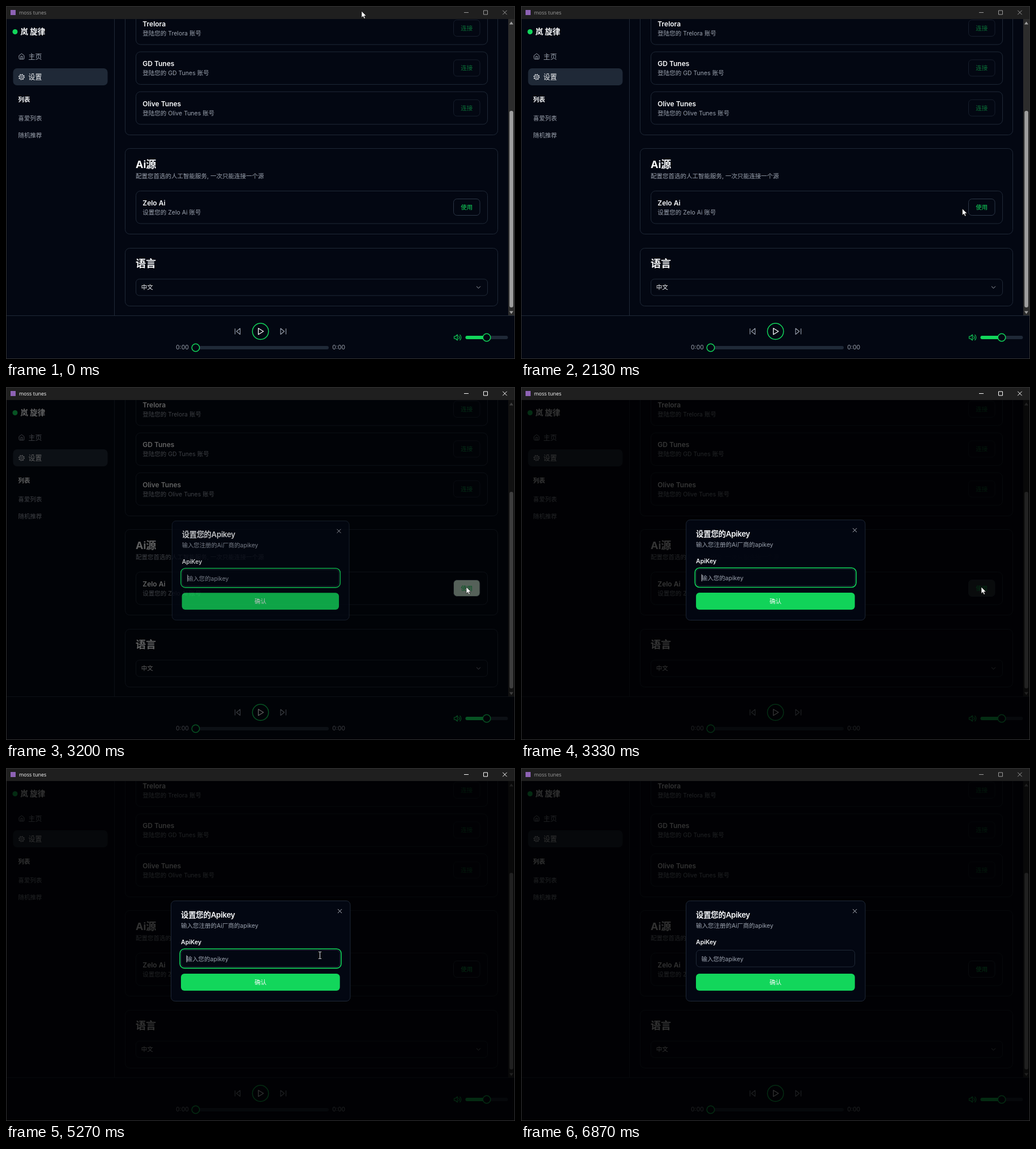
An HTML page that plays this animation: 899x623 px, repeating every 7.34 s.

```html
<!DOCTYPE html>
<html lang="zh-CN">
<head>
<meta charset="utf-8">
<title>Player settings</title>
<style>
  html, body { margin: 0; width: 100%; height: 100%; overflow: hidden; background: #030712; }
  svg { display: block; }
  text { font: 400 10.5px Inter, "Noto Sans CJK SC", "Noto Sans CJK", sans-serif; fill: #9ca3af; white-space: pre; }
  .brand { font-size: 13.5px; font-weight: 700; fill: #f9fafb; }
  .nav { font-size: 12px; }
  .name { font-size: 12px; font-weight: 600; fill: #f9fafb; }
  .head { font-size: 18px; font-weight: 700; fill: #f9fafb; }
  .strong { font-weight: 600; fill: #f9fafb; }
  .mid { font-weight: 500; fill: #f9fafb; }
  .act { font-weight: 500; fill: #12d65b; text-anchor: middle; }
  .box { fill: none; stroke: #1f2937; }
  .icon { fill: none; stroke: #9ca3af; stroke-linecap: round; stroke-linejoin: round; }
  .green { stroke: #12d65b; }
  .knob { fill: #030712; stroke: #12d65b; stroke-width: 1.5; }
  .caption { font: 400 9px "Open Sans", sans-serif; fill: inherit; }
</style>
</head>
<body>
<svg width="899" height="623" viewBox="0 0 899 623">
  <rect width="899" height="623" fill="#030712"/>

  <!-- sidebar -->
  <circle cx="16" cy="45.5" r="4.5" fill="#12d65b"/>
  <text class="brand" x="25.5" y="50.3">岚 旋律</text>
  <g class="icon" transform="translate(21.7 83) scale(.49)" stroke-width="2">
    <path d="M3 9l9-7 9 7v11a2 2 0 0 1-2 2H5a2 2 0 0 1-2-2zM9 22V12h6v10"/>
  </g>
  <text class="nav" x="39.5" y="93.7">主页</text>
  <rect x="12.5" y="110" width="167" height="30" rx="7" fill="#1f2937"/>
  <g fill="none" stroke="#e5e7eb" transform="translate(27.5 125.3)">
    <circle r="3.9"/>
    <circle r="4.8" stroke-width="1.3" stroke-dasharray="1.7 2.07"/>
    <circle r="1.6" stroke-width=".9"/>
  </g>
  <text class="nav" x="39.5" y="129.9" style="fill:#f9fafb">设置</text>
  <text class="strong" x="21.5" y="169.2">列表</text>
  <text x="21.5" y="202.2">喜爱列表</text>
  <text x="21.5" y="232.2">随机推荐</text>
  <path class="box" d="M191.5 23V546"/>

  <!-- settings cards -->
  <path class="box" d="M210.5 23V219.5a8 8 0 0 0 8 8H860.5a8 8 0 0 0 8-8V23"/>
  <g id="services"></g>
  <rect class="box" x="210.5" y="251.5" width="658" height="151" rx="8"/>
  <text class="head" x="229" y="285.6">Ai源</text>
  <text x="229" y="304.2">配置您首选的人工智能服务, 一次只能连接一个源</text>
  <g transform="translate(0 326)">
    <rect class="box" x="229.5" y=".5" width="621" height="57.5" rx="8"/>
    <text class="name" x="241.3" y="26">Zelo Ai</text>
    <text x="241.3" y="41.8">设置您的 Zelo Ai 账号</text>
    <rect id="use" x="790.5" y="14.5" width="46.5" height="29" rx="6" fill="#dcfce7" fill-opacity="0" stroke="#2b3646"/>
    <text class="act" x="813.7" y="33">使用</text>
  </g>
  <rect class="box" x="210.5" y="427.5" width="658" height="102" rx="8"/>
  <text class="head" x="229" y="461">语言</text>
  <rect class="box" x="229.5" y="482" width="621" height="29" rx="6"/>
  <text class="mid" x="238.8" y="500.4">中文</text>
  <path class="icon" d="M831.3 495l3.2 3.2 3.2-3.2"/>

  <!-- scrollbar -->
  <rect x="887" y="23" width="11" height="523" fill="#2c2c2c"/>
  <rect x="889.3" y="185" width="6.6" height="347" rx="3.3" fill="#9f9f9f"/>
  <path d="M889 32.5h7l-3.5-5zM889 538.5h7l-3.5 5z" fill="#9f9f9f"/>

  <!-- player -->
  <path class="box" d="M1 546.5H898"/>
  <g class="icon" stroke-width="1.1">
    <path d="M404.5 569.5v9.5M413.5 569v10.5l-6.5-5.25z"/>
    <path d="M494.5 569.5v9.5M485 569v10.5l6.5-5.25z"/>
    <path d="M445.7 568.8v11l9-5.5z" stroke="#f9fafb" stroke-width="1.3"/>
  </g>
  <circle class="icon green" cx="449.5" cy="574.3" r="14.2" stroke-width="1.5"/>
  <text x="300" y="606.3">0:00</text>
  <text x="576.3" y="606.3">0:00</text>
  <rect x="329" y="600" width="241" height="6" rx="3" fill="#1f2937"/>
  <circle class="knob" cx="335" cy="603" r="6.8"/>
  <path class="icon green" stroke-width="1.1" d="M791.5 583v4h2.4l3.4 3v-10l-3.4 3zM799.7 582.6a3.4 3.4 0 0 1 0 4.8M801.8 580.4a6.5 6.5 0 0 1 0 9.2"/>
  <rect x="811.5" y="582" width="75" height="6" rx="3" fill="#1f2937"/>
  <rect x="811.5" y="582" width="37" height="6" rx="3" fill="#12d65b"/>
  <circle class="knob" cx="849" cy="585" r="6.8"/>

  <!-- dialog -->
  <rect id="shade" y="23" width="899" height="600" opacity="0"/>
  <g id="dialog" opacity="0">
    <rect x="291.5" y="234.5" width="316.5" height="177" rx="7" fill="#030712" stroke="#1f2937"/>
    <text class="brand" x="309" y="263.6" style="font-weight:600;letter-spacing:-.34px">设置您的Apikey</text>
    <text x="309" y="282.2">输入您注册的Ai厂商的apikey</text>
    <path class="icon" style="stroke:#b9bec8" d="M586.4 249.4l6.4 6.4m0-6.4l-6.4 6.4"/>
    <text class="strong" x="309" y="311">ApiKey</text>
    <rect class="box" x="309.5" y="321.5" width="280" height="29.5" rx="6"/>
    <rect id="ring" class="icon green" x="307.2" y="319.2" width="284.8" height="34.2" rx="8" stroke-width="1.6"/>
    <text x="318.6" y="341">输入您的apikey</text>
    <path id="caret" d="M319.2 330.5v12.5" stroke="#e5e7eb" stroke-width=".9"/>
    <rect x="309" y="363" width="280.7" height="30" rx="6" fill="#12d65b"/>
    <text class="mid" x="449.4" y="382.2" text-anchor="middle">确认</text>
  </g>

  <!-- title bar -->
  <rect width="899" height="23" fill="#1f1f1f"/>
  <rect x="8" y="7" width="9" height="9" fill="#8d62b4"/>
  <g id="bar" fill="#9c9c9c" stroke="#9c9c9c">
    <text class="caption" x="23" y="15" stroke="none">moss tunes</text>
    <path fill="none" d="M809 11.5h8M843.5 8h7v7h-7zM877.3 7.8l7.4 7.4m0-7.4l-7.4 7.4"/>
  </g>
  <rect x=".5" y=".5" width="898" height="622" fill="none" stroke="#333"/>

  <!-- pointers -->
  <path id="arrow" d="M0 0V11.6L2.7 9.1 4.6 13.3 6.5 12.5 4.7 8.4H8.3Z" fill="#fff" stroke="#000" stroke-width=".6"/>
  <path id="beam" d="M-2.5-6h2L0-5.5.5-6h2M0-5.5V5.5M-2.5 6h2L0 5.5.5 6h2" fill="none" stroke="#e8e8e8"/>
</svg>

<script>
const LOOP = 7340, STEP = 1000 / 15;
const el = id => document.getElementById(id);
const clamp = v => Math.min(1, Math.max(0, v));
const set = (id, name, value) => el(id).setAttribute(name, value);
const show = (id, on) => set(id, 'visibility', on ? 'visible' : 'hidden');

el('services').innerHTML = ['Trelora', 'GD Tunes', 'Olive Tunes'].map((name, i) => `
  <g transform="translate(0 ${10 + i * 70.4})">
    <rect class="box" x="229.5" y=".5" width="621" height="57.5" rx="8"/>
    <text class="name" x="241.3" y="26">${name}</text>
    <text x="241.3" y="41.8">登陆您的 ${name} 账号</text>
    <g opacity=".5">
      <rect x="790.5" y="14.5" width="46.5" height="29" rx="6" fill="none" stroke="#2b3646"/>
      <text class="act" x="813.7" y="33">连接</text>
    </g>
  </g>`).join('');

const linear = s => s;
const smooth = s => s * s * (3 - 2 * s);
const out = s => 1 - (1 - s) ** 2;

// pointer stops: tick, x, y, easing towards the stop
const stops = [
  [1, 628, 9, linear], [9, 397, 325, smooth], [15, 397, 325, linear],
  [26, 777.5, 358, smooth], [31, 777.5, 358, linear], [38, 813, 353, smooth],
  [54, 813, 353, linear], [59, 632, 347, linear], [66, 560, 333, out],
  [72, 554.5, 330.5, out], [86, 554.5, 330.5, linear], [89, 163, 606, linear]
];

function pointer(tick) {
  const i = stops.findIndex(s => s[0] >= tick);
  if (i < 0) return null;
  const b = stops[i], a = stops[i - 1] || b;
  const s = a === b ? 1 : b[3]((tick - a[0]) / (b[0] - a[0]));
  return [a[1] + (b[1] - a[1]) * s, a[2] + (b[2] - a[2]) * s];
}

function draw(t) {
  const tick = Math.floor((t + 4) / STEP);

  const p = pointer(tick);
  const typing = p && tick > 50 && p[0] < 590 && p[1] > 321 && p[1] < 351;
  show('arrow', p && !typing);
  show('beam', typing);
  if (p) set(typing ? 'beam' : 'arrow', 'transform', `translate(${p[0]} ${p[1]})`);

  const hover = tick < 49 ? clamp((tick - 33.7) / 2.25) : clamp((50.4 - tick) / 2.25);
  set('use', 'fill-opacity', hover);

  const active = tick >= 44 && tick < 103;
  set('bar', 'fill', active ? '#fff' : '#9c9c9c');
  set('bar', 'stroke', active ? '#fff' : '#9c9c9c');

  const open = 1 - 0.235 ** Math.max(0, tick - 47);
  const k = tick > 50 ? 1 : open;
  const scale = 0.95 + 0.05 * k;
  set('shade', 'opacity', 0.8 * k);
  set('dialog', 'opacity', k);
  set('dialog', 'transform',
    `translate(449.5 ${323 + 3.5 * (1 - k)}) scale(${scale}) translate(-449.5 -323)`);
  show('ring', tick < 103);
  show('caret', tick >= 47 && tick < 103 && Math.floor((tick - 47) / 8) % 2 === 0);
}

function loop() {
  draw(performance.now() % LOOP);
  requestAnimationFrame(loop);
}
loop();
</script>
</body>
</html>
```
